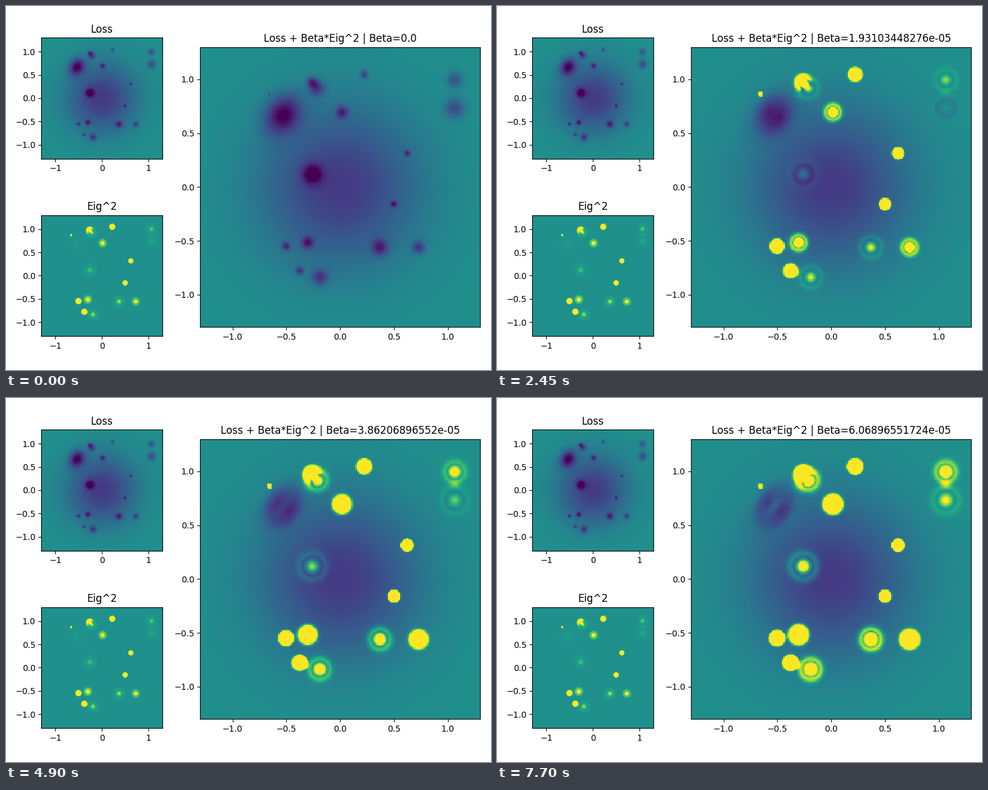
A matplotlib script for the animation above (8000 ms loop, 800 by 600 pixels).

```python
import numpy as np
import matplotlib.pyplot as plt
from matplotlib.animation import FuncAnimation

W, H, DPI = 800, 600, 100
LIM, CELLS = 1.3, 200
CELL = 2 * LIM / CELLS
TICK_MS, LOOP_MS, STEP_MS = 50, 8000, 350
BETAS = np.linspace(0, 8e-5, 30)

plt.rcParams.update({"font.family": "DejaVu Sans", "font.size": 10,
                     "text.kerning_factor": 6})

# Centres of the round wells, grouped by sigma in half cells
WELLS = {
    1: [(-0.656, 0.860)],
    3: [(0.623, 0.311), (0.501, -0.162)],
    4: [(0.224, 1.042), (-0.501, -0.551), (-0.375, -0.779)],
    5: [(-0.261, 0.970)],
    6: [(0.729, -0.561), (-0.300, -0.518), (0.018, 0.691)],
    8: [(0.370, -0.561), (-0.188, -0.838), (1.065, 0.992), (-0.215, 0.918)],
    10: [(-0.257, 0.116), (1.066, 0.729)],
}


def wells():
    """Yield x, y, depth, major sigma, minor sigma, angle."""
    yield 0, 0, 1.33, 0.53, 0.53, 0
    yield -0.53, 0.67, 1.72, 0.132, 0.107, np.radians(55)
    for size, centres in WELLS.items():
        sigma = size * CELL / 2
        for x, y in centres:
            yield x, y, 1.42 - 0.32 * np.hypot(x, y), sigma, sigma, 0


def surface():
    """Loss and squared spectral norm of its Hessian, both analytic."""
    axis = (np.arange(CELLS) + 0.5) * CELL - LIM
    x, y = np.meshgrid(axis, axis)
    loss, hxx, hyy, hxy = np.zeros((4, CELLS, CELLS))
    for cx, cy, depth, s1, s2, angle in wells():
        c, s = np.cos(angle), np.sin(angle)
        p, q = s1 ** -2, s2 ** -2
        pxx, pyy, pxy = p * c * c + q * s * s, p * s * s + q * c * c, (p - q) * c * s
        dx, dy = x - cx, y - cy
        u, v = pxx * dx + pxy * dy, pxy * dx + pyy * dy
        g = depth * np.exp(-(u * dx + v * dy) / 2)
        loss -= g
        hxx += g * (pxx - u * u)
        hyy += g * (pyy - v * v)
        hxy += g * (pxy - u * v)
    eig = np.abs(hxx + hyy) / 2 + np.hypot((hxx - hyy) / 2, hxy)
    return loss, eig ** 2


def panel(left, top, width, height, data, span, title, xstep):
    ax = fig.add_axes([left / W, 1 - (top + height) / H, width / W, height / H])
    img = ax.imshow(data, origin="lower", extent=[-LIM, LIM, -LIM, LIM], aspect="auto",
                    cmap="viridis", vmin=-span, vmax=span, interpolation="nearest")
    ax.set_xticks(np.arange(-1, 1 + xstep, xstep))
    ax.set_yticks(np.arange(-1, 1.5, 0.5))
    return img, ax.set_title(title, fontsize=12)


fig = plt.figure(figsize=(W / DPI, H / DPI), dpi=DPI, facecolor="white")
loss, eig2 = surface()
panel(58.4, 52.15, 199.8, 199.6, loss, 2, "Loss", 1)
panel(58.4, 344.7, 199.8, 199.6, eig2, 2.4e5, "Eig^2", 1)
mix, label = panel(320.4, 67.7, 461.4, 461.4, loss, 2, "", 0.5)


def update(tick):
    beta = BETAS[tick * TICK_MS // STEP_MS]
    mix.set_data(loss + beta * eig2)
    text = f"{beta:.12g}" if beta else "0.0"
    label.set_text(f"Loss + Beta*Eig^2 | Beta={text}")
    return mix, label


anim = FuncAnimation(fig, update, frames=LOOP_MS // TICK_MS, interval=TICK_MS,
                     repeat=True, repeat_delay=0)
plt.show()
```
